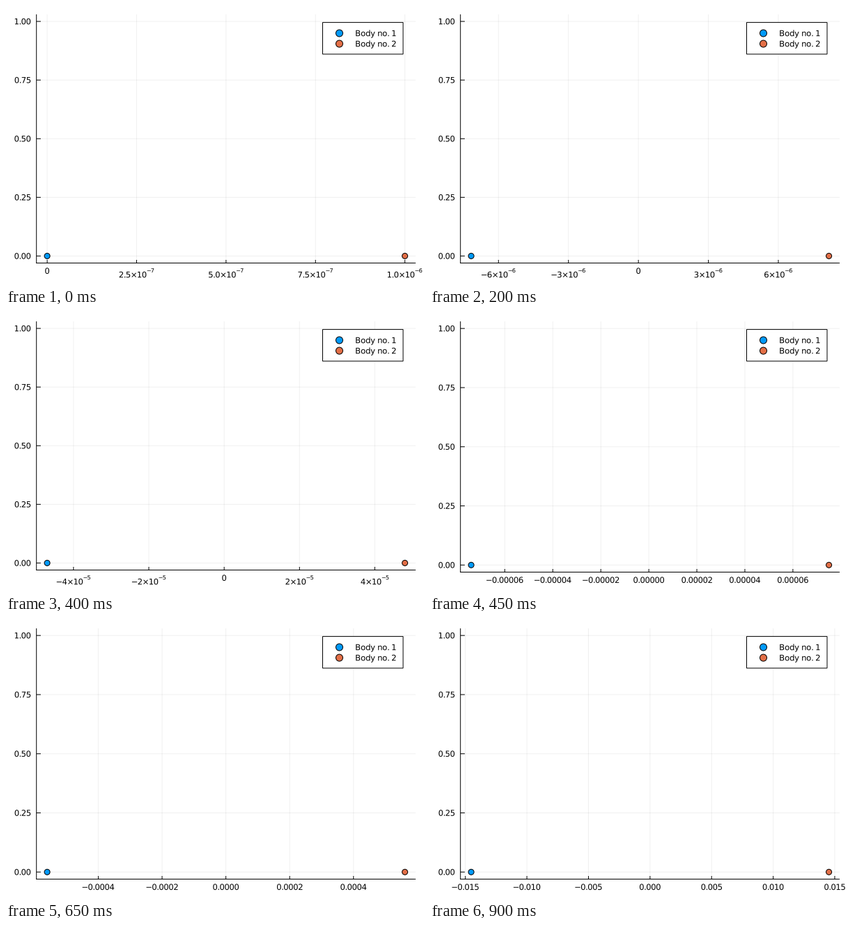
Animation of 600 by 400 pixels, one loop 0.95 s. Source, as a matplotlib script:

```python
import math

import matplotlib.pyplot as plt
import numpy as np
from matplotlib.animation import FuncAnimation
from matplotlib.patches import Circle, PathPatch, Rectangle
from matplotlib.path import Path
from matplotlib.textpath import TextPath

W, H, DPI = 600, 400, 100
FRAMES, INTERVAL = 19, 50
LEFT, RIGHT, TOP = 43.7, 588, 12
GLYPH, PITCH = 11.6, 11  # glyph size and the size that sets letter spacing
SUP = 0.7
X_TICK, Y_TICK = 4.5, 6.2
PX = 72 / DPI
BLUE, ORANGE = "#009AFA", "#E36F47"
BODIES = ((BLUE, "Body no. 1"), (ORANGE, "Body no. 2"))

# Drift of each body: smooth curve in log space through a few moments.
KEYS = [2, 6, 9, 11, 15, 18]
DRIFT = [2.293e-6, 1.9e-5, 7.4e-5, 1.927e-4, 1.8717e-3, 1.4525e-2]
CURVE = np.polyfit(KEYS, np.log(DRIFT), 5)

plt.rcParams["font.family"] = "DejaVu Sans"
fig = plt.figure(figsize=(W / DPI, H / DPI), dpi=DPI, facecolor="white")
ax = fig.add_axes([0, 0, 1, 1])


def drift(frame):
    return math.exp(np.polyval(CURVE, frame)) if frame else 0.0


def ticks(lo, hi):
    """Pick the best-scoring round tick values inside lo..hi."""
    span = hi - lo
    power = math.floor(math.log10(span))
    best = None
    for j in (power - 1, power):
        for q, nice in ((1, 1), (5, 0.9), (2, 0.7), (2.5, 0.5), (3, 0.2)):
            step = q * 10.0 ** j
            first, last = math.ceil(lo / step), math.floor(hi / step)
            n = last - first + 1
            if not 4 <= n <= 8:
                continue
            score = (0.25 * (1 - abs(n - 5) / 5) + 0.25 * nice
                     + 0.5 * span / ((n - 1) * step))
            rank = (round(score, 6), -n)
            if best is None or rank > best[0]:
                best = rank, [k * step for k in range(first, last + 1)]
    return best[1]


def decimals(values, tol):
    for p in range(10):
        if all(abs(round(v, p) - v) < tol for v in values):
            return p
    return 10


def is_scientific(values):
    return abs(math.log10(values[-1] - values[0])) > 4


def labels(values):
    """Return (main, exponent) text pairs."""
    if not is_scientific(values):
        p = decimals(values, 1e-3 * (values[1] - values[0]))
        pairs = [(f"{v:.{p}f}", "") for v in values]
    else:
        parts = [f"{v:.8e}".split("e") for v in values]
        p = decimals([float(m) for m, _ in parts], 1e-6)
        pairs = [(f"{float(m):.{p}f}×10", str(int(e))) if v else ("0", "")
                 for v, (m, e) in zip(values, parts)]
    return [(m.replace("-", "−"), e.replace("-", "−")) for m, e in pairs]


def ink_right(text, size):
    return TextPath((0, 0), text, size=size).get_extents().x1


def advance(char, scale):
    """Letter advance in whole pixels."""
    size = PITCH * scale
    return round(ink_right(char + "|", size) - ink_right("|", size))


def glyphs(text, scale=1.0, x=0.0, y=0.0):
    """Lay out text on a whole-pixel pen; return its path and end position."""
    parts = []
    for char in text:
        if char != " ":
            path = TextPath((0, 0), char, size=GLYPH * scale)
            parts.append(Path(path.vertices * [1, -1] + [x, y], path.codes))
        x += advance(char, scale)
    return Path.make_compound_path(*parts), x


def put(path, dx=0.0, dy=0.0):
    moved = Path(path.vertices + [dx, dy], path.codes)
    ax.add_patch(PathPatch(moved, fc="black", lw=0, zorder=6))


def put_text(text, x, y, align):
    path, _ = glyphs(text)
    box = path.get_extents()
    put(path, x - {"left": box.x0, "right": box.x1}[align], y)


def put_tick_label(main, exponent, x, axis_y):
    path, end = glyphs(main)
    y = axis_y + 15.4
    if exponent:
        sup, _ = glyphs(exponent, SUP, end, -7.2)
        path, y = Path.make_compound_path(path, sup), axis_y + 20.8
    box = path.get_extents()
    put(path, x - (box.x0 + box.x1) / 2, y)


def line(x0, y0, x1, y1, alpha=1.0, z=2):
    ax.plot([x0, x1], [y0, y1], color="black", lw=PX, alpha=alpha,
            solid_capstyle="butt", snap=False, zorder=z)


def dot(x, y, r, color, z):
    ax.add_patch(Circle((x, y), r, fc=color, ec="black", lw=PX, zorder=z))


def draw_legend():
    ax.add_patch(Rectangle((454.5, 23.6), 115.5, 45.4, fc="white", ec="black",
                           lw=PX, snap=False, zorder=4))
    for i, (color, name) in enumerate(BODIES):
        y = 39 + 15.1 * i
        dot(478.5, y, 5, color, 5)
        put_text(name, 502.3, y + 4.2, "left")


def draw(frame):
    ax.clear()
    ax.set(xlim=(0, W), ylim=(H, 0))
    ax.axis("off")

    d = drift(frame)
    bodies = (-d, 1e-6 + d)
    pad = 0.03 * (bodies[1] - bodies[0])
    lo, hi = bodies[0] - pad, bodies[1] + pad
    xs, ys = ticks(lo, hi), ticks(-0.03, 1.03)
    bottom = 368.5 if is_scientific(xs) else 371.5

    def px(x):
        return LEFT + (x - lo) / (hi - lo) * (RIGHT - LEFT)

    def py(y):
        return bottom - (y + 0.03) / 1.06 * (bottom - TOP)

    for x, (main, exponent) in zip(xs, labels(xs)):
        line(px(x), TOP, px(x), bottom, 0.06, 1)
        line(px(x), bottom, px(x), bottom - X_TICK)
        put_tick_label(main, exponent, px(x), bottom)
    for y, (main, _) in zip(ys, labels(ys)):
        line(LEFT, py(y), RIGHT, py(y), 0.06, 1)
        line(LEFT, py(y), LEFT + Y_TICK, py(y))
        put_text(main, 35.2, py(y) + 4.2, "right")
    line(LEFT, TOP, LEFT, bottom + 0.5)
    line(LEFT - 0.5, bottom, RIGHT, bottom)

    for x, (color, _) in zip(bodies, BODIES):
        dot(px(x), py(0), 4, color, 3)
    draw_legend()
    return []


anim = FuncAnimation(fig, draw, frames=FRAMES, init_func=lambda: draw(0),
                     interval=INTERVAL, repeat=True, repeat_delay=0)
plt.show()
```
